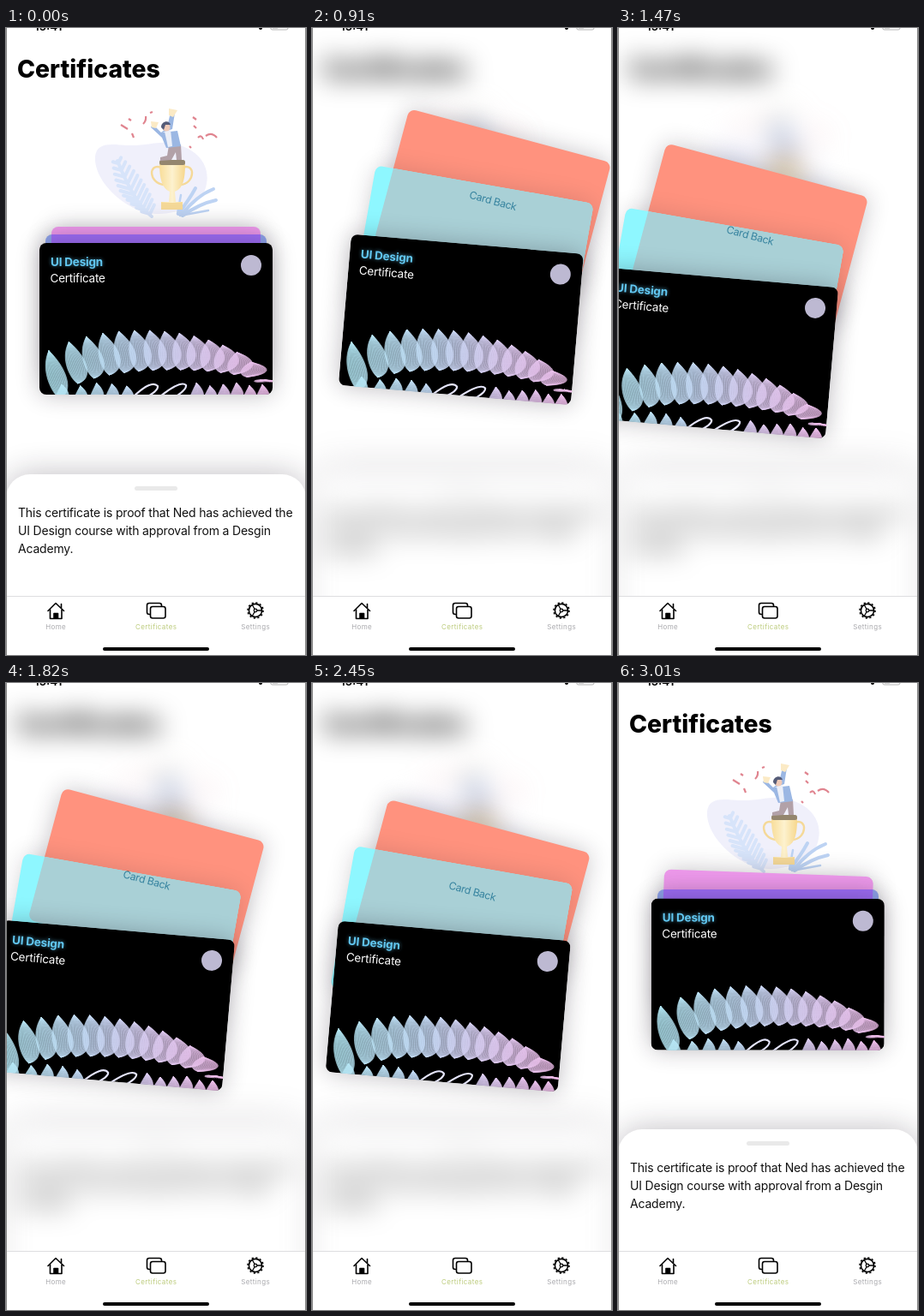
An HTML page for the animation above (3.08 s loop, 350 by 732 pixels).

```html
<!DOCTYPE html>
<html lang="en">
<head>
<meta charset="utf-8">
<title>Certificates</title>
<style>
  html, body { margin: 0; width: 100%; height: 100%; overflow: hidden; background: #fff; }
  svg { display: block; width: 350px; height: 732px; font-family: Inter, Roboto, sans-serif; }
  .title { font-size: 28.3px; font-weight: 800; }
  .body { font-size: 14px; letter-spacing: -.18px; fill: #111; }
  .course { font-size: 13.4px; font-weight: 700; letter-spacing: -.15px; fill: #62c8f2; }
  .kind { font-size: 13.5px; letter-spacing: -.22px; fill: #fff; }
  .back-label { font-size: 12.2px; letter-spacing: -.35px; text-anchor: middle; }
  .tab { font-size: 8px; letter-spacing: .38px; text-anchor: middle; fill: #a9a9ad; }
  .tab.active { fill: #bccb7c; }
  .icon { fill: none; stroke: #000; stroke-width: 1.6; stroke-linejoin: round; stroke-linecap: round; }
  .shade { fill: #1c1424; }
</style>
</head>
<body>
<svg viewBox="0 0 350 732">
  <defs>
    <filter id="soften" filterUnits="userSpaceOnUse" x="-60" y="-60" width="470" height="860" color-interpolation-filters="sRGB">
      <feGaussianBlur id="softenBlur" stdDeviation="0"/>
    </filter>
    <filter id="cardShade" filterUnits="userSpaceOnUse" x="-60" y="150" width="470" height="380" color-interpolation-filters="sRGB">
      <feGaussianBlur stdDeviation="14"/>
    </filter>
    <filter id="sheetShade" filterUnits="userSpaceOnUse" x="-80" y="420" width="510" height="420" color-interpolation-filters="sRGB">
      <feGaussianBlur stdDeviation="19"/>
    </filter>
    <filter id="glow" x="-20%" y="-60%" width="140%" height="220%">
      <feGaussianBlur stdDeviation="2"/>
    </filter>
    <linearGradient id="feather" gradientUnits="userSpaceOnUse" x1="45" y1="0" x2="310" y2="0">
      <stop offset="0" stop-color="#b2e8f4"/>
      <stop offset=".4" stop-color="#c6dbf7"/>
      <stop offset=".7" stop-color="#dfccf3"/>
      <stop offset="1" stop-color="#f0bcea"/>
    </linearGradient>
    <linearGradient id="gold" x1="0" y1="0" x2="1" y2="0">
      <stop offset="0" stop-color="#f8d98c"/>
      <stop offset=".5" stop-color="#fdf0c8"/>
      <stop offset="1" stop-color="#f6d27e"/>
    </linearGradient>
    <clipPath id="frontClip"><rect x="39" y="251" width="272" height="177" rx="8"/></clipPath>
    <clipPath id="middleClip"><rect class="middle" x="46" y="255.5" width="258" height="168" rx="8"/></clipPath>
  </defs>
  <rect width="350" height="732" fill="#fff"/>

  <g filter="url(#soften)">
    <text class="title" x="13" y="58">Certificates</text>
    <g opacity=".88">
      <path d="M104 150C106 132 124 136 142 137C168 138 178 130 200 136C224 143 238 160 234 182C230 206 206 216 178 217C146 219 102 182 104 150Z" fill="#eeeefb"/>
      <g id="fern"></g>
      <g fill="none" stroke="#b4cdf2" stroke-linecap="round" stroke-width="4">
        <path d="M201 217Q214 200 221 187M205 218Q222 196 242 188M206 219Q226 205 245 201"/>
        <path d="M203 219L236 213M200 217L204 195" stroke-width="2.5"/>
      </g>
      <path d="M181 163C166 157 166 181 184 183M206 163C221 157 221 181 204 183" fill="none" stroke="#f4d48a" stroke-width="2.4"/>
      <path d="M179 158H209C209 176 207 187 197 191L198 203H206V212H181V203H190L191 191C182 187 179 176 179 158Z" fill="url(#gold)"/>
      <path d="M181 204H206V212H181Z" fill="#f4d48a"/>
      <rect x="179" y="154" width="30" height="6" rx="2.5" fill="#86765a"/>
      <path d="M190 137L204 136L205 154H199L198 145L193 154L180 155V151L188 149Z" fill="#a8949c"/>
      <path d="M182 122L194 118L197 99L192 98L188 116L181 122L171 112L169 116L182 128L187 140L204 138L200 120Z" fill="#8eaee0"/>
      <path d="M185 121L192 119L194 138L189 139Z" fill="#e9edf8"/>
      <circle cx="187" cy="116" r="4.5" fill="#edc3ad"/>
      <path d="M181 116C181 108 191 107 192 113L186 113L184 119Z" fill="#3e4666"/>
      <path d="M190 94L200 96L195 104L190 102ZM169 109L178 110L175 117L170 116Z" fill="#fbe7bd"/>
      <path d="M134 113L142 118M143 106L146 108M147 123L149 128M160 112Q164 108 163 103M168 99L171 98M218 104L222 107M219 114L222 117M224 128Q228 124 230 130M233 126Q240 121 246 128M214 138L216 140" fill="none" stroke="#dc7480" stroke-width="2.2"/>
    </g>
  </g>

  <g filter="url(#soften)">
    <rect class="shade" x="0" y="521" width="350" height="230" rx="28" opacity=".28" filter="url(#sheetShade)"/>
    <rect x="0" y="521" width="350" height="260" rx="28" fill="#fff"/>
    <rect x="150" y="535" width="50" height="5" rx="2.5" fill="#e9e9e9"/>
    <text class="body">
      <tspan x="14" y="571">This certificate is proof that Ned has achieved the</tspan>
      <tspan x="14" y="592">UI Design course with approval from a Desgin</tspan>
      <tspan x="14" y="613">Academy.</tspan>
    </text>
  </g>

  <g class="back">
    <rect class="shade" x="53" y="260" width="244" height="159" rx="8" opacity=".25" filter="url(#cardShade)"/>
    <rect id="backFill" x="53" y="260" width="244" height="159" rx="8"/>
    <text class="back-label" x="175" y="343" fill="#222">Card Back</text>
  </g>
  <g class="middle">
    <rect class="shade" x="46" y="255.5" width="258" height="168" rx="8" opacity=".15" filter="url(#cardShade)"/>
    <rect id="middleFill" x="46" y="255.5" width="258" height="168" rx="8"/>
  </g>
  <g clip-path="url(#middleClip)">
    <g class="back">
      <rect id="overlapFill" x="53" y="260" width="244" height="159" rx="8"/>
      <text class="back-label" x="175" y="343" fill="#36839f">Card Back</text>
    </g>
  </g>
  <g class="front">
    <rect class="shade" x="39" y="251" width="272" height="177" rx="8" opacity=".28" filter="url(#cardShade)"/>
    <g clip-path="url(#frontClip)">
      <rect x="39" y="251" width="272" height="177"/>
      <g id="feathers" fill="url(#feather)" stroke="url(#feather)"></g>
      <path d="M148 431Q170 410 177 418Q178 423 164 431M180 430Q204 411 210 417Q211 422 197 431" fill="none" stroke="#e4e4fa" stroke-width="2.2"/>
    </g>
    <text class="course" x="52" y="278" filter="url(#glow)" opacity=".6">UI Design</text>
    <text class="course" x="52" y="278">UI Design</text>
    <text class="kind" x="51.5" y="297">Certificate</text>
    <circle cx="286" cy="277" r="12" fill="#bdb9d2"/>
  </g>

  <rect y="663" width="350" height="69" fill="#fff"/>
  <path d="M0 663.5H350" stroke="#dedee0"/>
  <g class="icon">
    <path d="M49 680.5L58 671.5L67.5 680.5M51.5 679V689.5H65V679M64.5 677V672.5"/>
    <path d="M56 689V683.5H60.5V689Z" fill="#000"/>
    <path d="M168 684.5H167Q164.5 684.5 164.5 682V674Q164.5 671.5 167 671.5H179Q181.5 671.5 181.5 674V675"/>
    <rect x="168.5" y="675.5" width="17.5" height="13.5" rx="2.5"/>
    <circle cx="291" cy="680" r="7.6"/>
    <circle cx="291" cy="680" r="9" stroke-width="1.6" stroke-dasharray="2.2 2.512" stroke-linecap="butt"/>
    <path d="M291 680H298.5M291 680L287.3 686.5M291 680L287.3 673.5" stroke-width="1.3"/>
    <circle cx="291" cy="680" r="1.8" fill="#fff" stroke-width="1.2"/>
  </g>
  <text class="tab" x="58.2" y="702">Home</text>
  <text class="tab active" x="175.2" y="702">Certificates</text>
  <text class="tab" x="291.2" y="702">Settings</text>
  <rect x="113" y="723" width="124" height="4" rx="2"/>
  <text x="33" y="2.5" font-size="13.5" font-weight="600">15:41</text>
  <circle cx="297" cy="0" r="2"/>
  <path d="M309 0V1Q309 2 311 2H327Q329 2 329 0M311 0H317" fill="none" stroke="#b4b4b4"/>
  <path d="M.5 0V732M349.5 0V732" stroke="#858585"/>
</svg>
<script>
const LOOP = 3080, STEP = 70, GRAB = 360, RELEASE = 2475;
const byId = id => document.getElementById(id);
const lerp = (a, b, p) => a + (b - a) * p;
const clamp = p => Math.min(1, Math.max(0, p));
const ease = x => (x = clamp(x), x * x * (3 - 2 * x));

const spring = ms => {
  const s = Math.max(0, ms) / 1000;
  return 1 - Math.exp(-7.8 * s) * (Math.cos(12.47 * s) + .625 * Math.sin(12.47 * s));
};
// Progress towards the fanned-out state, rising at the grab and falling at the release.
const shown = (t, curve) => t < RELEASE ? curve(t - GRAB) : 1 - curve(t - RELEASE);
const timed = ms => x => ease(x / ms);

const DRAG_TIMES = [860, 1120, 1470, 1820, 2170, RELEASE];
function track(values, t) {
  const T = DRAG_TIMES, last = T.length - 1;
  if (t <= T[0]) return values[0];
  if (t >= T[last]) return values[last];
  const i = T.findIndex(k => k > t) - 1;
  const slope = k => k <= 0 || k >= last ? 0 : (values[k + 1] - values[k - 1]) / (T[k + 1] - T[k - 1]);
  const span = T[i + 1] - T[i], u = (t - T[i]) / span;
  return lerp(values[i], values[i + 1], ease(u))
    + span * u * (1 - u) * (slope(i) * (1 - u) - slope(i + 1) * u);
}

const cards = [
  { name: 'front', angle: 5, rest: 0, lift: 0, rise: spring, fall: spring,
    x: [0, -20, -61, -51, -34, -16], y: [0, 14, 40, 37, 40, 38] },
  { name: 'middle', angle: 10, rest: -14.5, lift: -76, rise: timed(500), fall: timed(500),
    x: [0, -20, -66, -55, -44, -25], y: [0, 14, 50, 39, 58, 30] },
  { name: 'back', angle: 15, rest: -28, lift: -142.5, rise: timed(550), fall: timed(700),
    x: [0, -18, -58, -48, -35, -25], y: [0, 12, 41, 29, 46, 42] }
];
for (const card of cards) card.nodes = document.querySelectorAll('.' + card.name);

const mix = (a, b, p) => `rgb(${a.map((v, i) => Math.round(lerp(v, b[i], p)))})`;

// Each feather is a pointed tip over a rounded foot, filled softly and hatched with fine strands.
function feather(tx, ty, fx, fy, wide) {
  const h = Math.max(14, fy - ty);
  const side = s => {
    const reach = lerp(-.45, 1, s) * wide;
    return `C${tx + reach} ${ty + h * .42} ${fx + reach * .7} ${fy - h * .08} ${fx} ${fy}`;
  };
  let strands = '';
  for (let j = 0; j <= 14; j++) strands += `M${tx} ${ty}${side(j / 14)}`;
  const right = `C${fx + wide * .7} ${fy - h * .08} ${tx + wide} ${ty + h * .42} ${tx} ${ty}Z`;
  return `<path d="M${tx} ${ty}${side(0)}${right}" stroke="none" opacity=".68"/>`
    + `<path d="${strands}" fill="none" stroke-width=".7" opacity=".85"/>`;
}

function drawFeathers() {
  const arch = (x, mid, half) => Math.sqrt(Math.max(0, 1 - ((x - mid) / half) ** 2));
  let art = '';
  for (let k = 0; k < 15; k++) {
    const u = (k / 14) ** .9, tx = 50 + 252 * u, fx = 62 + 234 * u;
    art += feather(tx, 428 - 75 * arch(tx, 158, 148), fx, 432 - 33 * arch(fx, 195, 130), lerp(24, 32, u));
    if (k < 5 || k > 8) art += feather(fx + 3, 416 + 2 * Math.sin(k * 2), fx - 6, 450, 18);
  }
  byId('feathers').innerHTML = art;
}

function drawFern() {
  let leaves = '';
  for (let i = 0; i < 11; i++) {
    const u = i / 10, x = lerp(168, 131, u), y = lerp(217, 158, u) + 7 * Math.sin(u * Math.PI);
    const size = 5 + 13 * Math.sin((.15 + .8 * u) * Math.PI);
    leaves += `M${x} ${y}l${-size * .9} ${-size * .25}M${x} ${y}l${size * .45} ${-size * .95}`;
  }
  byId('fern').innerHTML = `<path d="${leaves}M170 220Q150 205 130 155" fill="none" stroke="#d2e1fa" stroke-width="4" stroke-linecap="round"/>`;
}

function render(t) {
  const amount = {};
  for (const c of cards) {
    const p = amount[c.name] = shown(t, t < RELEASE ? c.rise : c.fall);
    const dx = track(c.x, t) * p, dy = track(c.y, t) * p;
    const pose = `translate(${dx} ${dy}) rotate(${c.angle * p} 175 339.5) translate(0 ${lerp(c.rest, c.lift, p)})`;
    c.nodes.forEach(node => node.setAttribute('transform', pose));
  }
  byId('backFill').setAttribute('fill', mix([236, 152, 234], [255, 146, 126], shown(t, timed(250))));
  byId('middleFill').setAttribute('fill', mix([138, 158, 228], [142, 247, 255], amount.middle));
  byId('overlapFill').setAttribute('fill', mix([154, 106, 240], [169, 208, 214], amount.middle));
  byId('softenBlur').setAttribute('stdDeviation', 15.5 * shown(t, timed(390)));
}

drawFeathers();
drawFern();
const start = performance.now();
function tick() {
  const t = (performance.now() - start) % LOOP;
  render(Math.floor(t / STEP) * STEP);
  requestAnimationFrame(tick);
}
tick();
</script>
</body>
</html>
```
